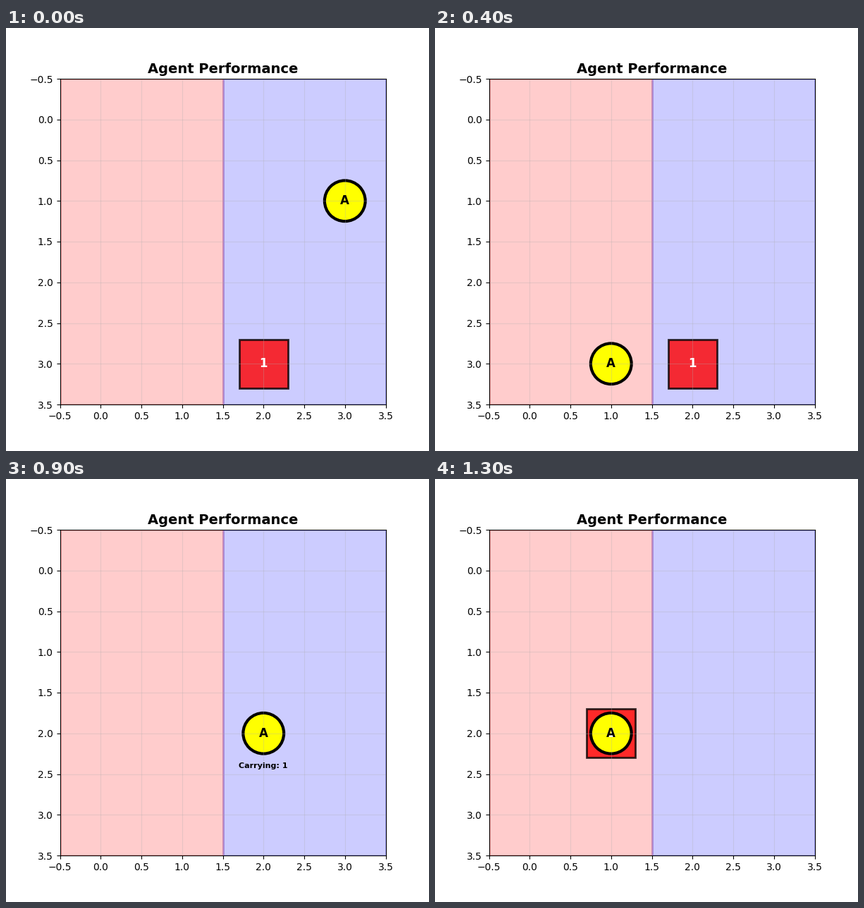
A matplotlib script for the animation above (1.4 s loop, 600 by 600 pixels).

```python
import matplotlib.pyplot as plt
from matplotlib.animation import FuncAnimation
from matplotlib.patches import Circle, Rectangle

START = (3, 1)
BOX_START = (2, 3)
MOVES = {"up": (0, -1), "down": (0, 1), "left": (-1, 0), "right": (1, 0)}
ACTIONS = ["down", "down", "left", "left", "right", "pick", "up",
           "drop", "pick", "drop", "pick", "left", "drop"]
BOX_SIZE = 0.6


def state_at(step):
    """Replay the actions: agent cell, box cell, whether the box is carried."""
    agent, box, carrying = START, BOX_START, False
    for action in ACTIONS[:step]:
        if action in MOVES:
            dx, dy = MOVES[action]
            agent = (agent[0] + dx, agent[1] + dy)
        else:
            carrying = action == "pick"
        if carrying:
            box = agent
    return agent, box, carrying


fig, ax = plt.subplots(figsize=(6, 6), dpi=100)
ax.set_xlim(-0.5, 3.5)
ax.set_ylim(3.5, -0.5)
ax.set_aspect("equal")
ax.grid(True, alpha=0.3)
ax.set_title("Agent Performance", fontsize=14, fontweight="bold")


def label(text, size, color="black"):
    return ax.text(0, 0, text, ha="center", va="center", fontsize=size,
                   fontweight="bold", color=color)


for left, color in ((-0.5, "red"), (1.5, "blue")):
    ax.add_patch(Rectangle((left, -0.5), 2, 4, color=color, alpha=0.2, linewidth=2))

box_patch = ax.add_patch(Rectangle((0, 0), BOX_SIZE, BOX_SIZE, facecolor="red",
                                   edgecolor="black", linewidth=2, alpha=0.8))
box_label = label("1", 12, "white")
agent_patch = ax.add_patch(Circle((0, 0), 0.25, facecolor="yellow",
                                  edgecolor="black", linewidth=3))
agent_label = label("A", 12)
carry_label = label("Carrying: 1", 8)


def update(step):
    (ax_x, ax_y), (box_x, box_y), carrying = state_at(step)
    box_patch.set_xy((box_x - BOX_SIZE / 2, box_y - BOX_SIZE / 2))
    box_label.set_position((box_x, box_y))
    agent_patch.center = (ax_x, ax_y)
    agent_label.set_position((ax_x, ax_y))
    carry_label.set_position((ax_x, ax_y + 0.4))
    box_patch.set_visible(not carrying)
    box_label.set_visible(not carrying)
    carry_label.set_visible(carrying)
    return box_patch, box_label, agent_patch, agent_label, carry_label


anim = FuncAnimation(fig, update, frames=len(ACTIONS) + 1, interval=100,
                     repeat=True, repeat_delay=0, blit=False)
plt.show()
```
